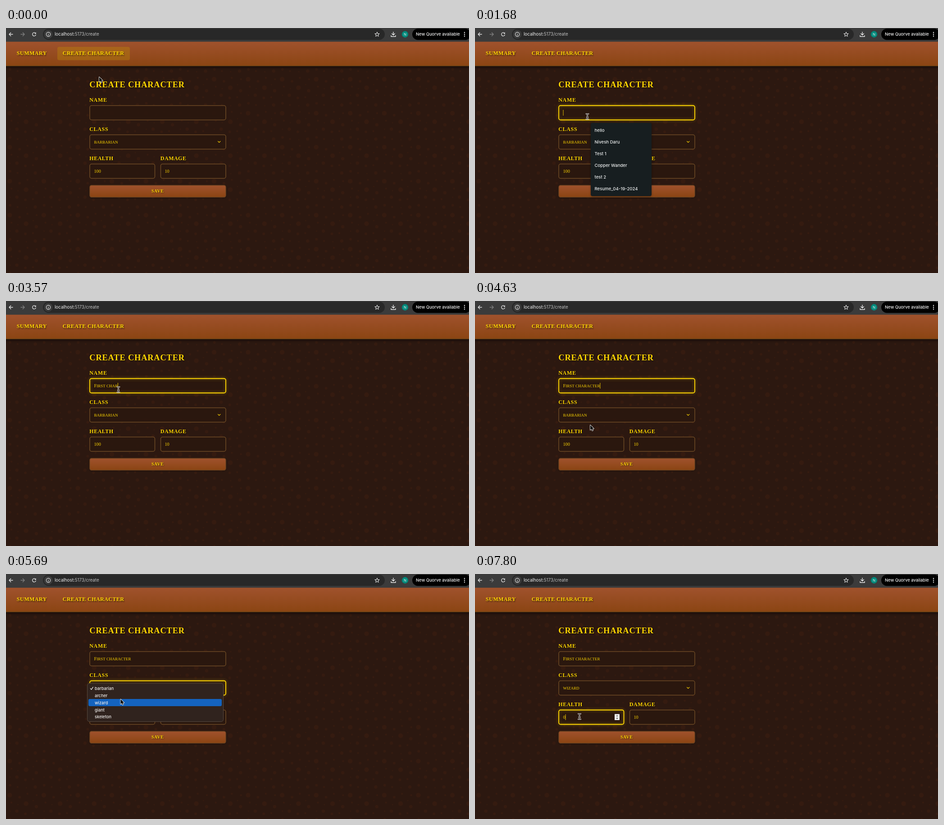
These frames come from a looping animation (1028 by 545 pixels, 8000 ms). An HTML page with a canvas:

```html
<!DOCTYPE html>
<html lang="en">
<head>
<meta charset="utf-8">
<title>Create Character</title>
<style>
html, body { margin: 0; width: 100%; height: 100%; overflow: hidden; background: #2c1810; }
canvas { display: block; width: 1028px; height: 545px; }
</style>
</head>
<body>
<canvas id="stage" width="1028" height="545"></canvas>
<script>
const W = 1028, H = 545, LOOP = 8000;
const GOLD = '#ffd700', BORDER = '#6d4a24';
const SERIF = '"Liberation Serif", "Noto Serif", serif';
const SANS = 'Inter, "Liberation Sans", sans-serif';

const stage = document.getElementById('stage').getContext('2d');
const page = document.createElement('canvas');
page.width = W;
page.height = H;
let c = page.getContext('2d');

const clamp = v => Math.max(0, Math.min(1, v));
const ramp = (t, start, length) => clamp((t - start) / length);
const ease = p => p * p * (3 - 2 * p);

function text(str, x, y, font, color, spacing = 0) {
  c.font = font;
  c.fillStyle = color;
  c.letterSpacing = spacing + 'px';
  c.fillText(str, x, y);
  return x + c.measureText(str).width;
}

function box(x, y, w, h, r, fill, stroke, line = 1.5) {
  c.beginPath();
  c.roundRect(x, y, w, h, r);
  if (fill) { c.fillStyle = fill; c.fill(); }
  if (stroke) { c.strokeStyle = stroke; c.lineWidth = line; c.stroke(); }
}

function disc(x, y, r, fill) {
  c.beginPath();
  c.arc(x, y, r, 0, 7);
  c.fillStyle = fill;
  c.fill();
}

function path(d, x, y, stroke, line, fill) {
  const p = new Path2D(d);
  c.save();
  c.translate(x, y);
  if (stroke) { c.strokeStyle = stroke; c.lineWidth = line; c.stroke(p); }
  if (fill) { c.fillStyle = fill; c.fill(p); }
  c.restore();
}

function shadow(color, blur, dx = 0, dy = 0) {
  c.shadowColor = color;
  c.shadowBlur = blur;
  c.shadowOffsetX = dx;
  c.shadowOffsetY = dy;
}

function heading(str, x, y, size, spacing) {
  c.save();
  shadow('rgba(0,0,0,.55)', 2, 1.2, 1.2);
  text(str, x, y, `bold ${size}px ${SERIF}`, GOLD, spacing);
  c.restore();
}

// Capitals with smaller capitals for lower case
function caps(str, x, y) {
  for (const run of str.match(/[A-Z0-9]+|[^A-Z0-9]+/g) || []) {
    const big = /[A-Z0-9]/.test(run);
    x = text(run.toUpperCase(), x, y, `${big ? 10.2 : 9}px ${SERIF}`, GOLD);
  }
  return x;
}

function brownGradient(y, h) {
  const g = c.createLinearGradient(0, y, 0, y + h);
  g.addColorStop(0, '#a0522d');
  g.addColorStop(1, '#8b4513');
  return g;
}

// x, y, radius in a tile of 100 units
const bubbles = [
  [11, 11, 7], [59, 36, 7], [16, 33, 3], [79, 64, 3], [34, 87, 3], [90, 11, 3],
  [12, 82, 4], [40, 17, 4], [63, 7, 3], [57, 66, 4], [86, 87, 5], [32, 58, 5],
  [89, 45, 5], [80, 27, 2], [60, 89, 2], [35, 39, 2], [12, 58, 2]
];

function drawToolbar() {
  c.fillStyle = '#3b3b3b';
  c.fillRect(0, 0, W, 30.5);
  box(82, 1.5, 759, 25, 12.5, '#282828');
  box(902, 1.5, 130, 25, 12.5, '#000');
  c.lineCap = c.lineJoin = 'round';
  path('M4 0H-4M-.3-3.8L-4 0L-.3 3.8', 11, 14, '#e4e4e4', 1.3);
  path('M-4 0H4M.3-3.8L4 0L.3 3.8', 37, 14, '#808080', 1.3);
  path('M3.6 1.2A3.8 3.8 0 1 1 2.8-2.6', 62.5, 14, '#e4e4e4', 1.3);
  path('M4.2-4.6V-1H.6Z', 62.5, 14, null, 0, '#e4e4e4');
  disc(94, 14, 9.5, '#3c3c3c');
  path('M4.6 0A4.6 4.6 0 1 1-4.6 0A4.6 4.6 0 1 1 4.6 0M0-.3V2.2M0-2.3V-2.2', 94, 14, '#e8e8e8', 1.1);
  const end = text('localhost:', 108, 17.4, `9.8px ${SANS}`, '#f0f0f0');
  text('5173/create', end, 17.4, `9.8px ${SANS}`, '#c0c0c0');

  let star = '';
  for (let i = 0; i < 10; i++) {
    const a = i * Math.PI / 5, r = i % 2 ? 2.3 : 5.3;
    star += `${i ? 'L' : 'M'}${r * Math.sin(a)} ${-r * Math.cos(a)}`;
  }
  path(star + 'Z', 824, 14.3, '#d8d8d8', 1.1);
  path('M0-5V1.6M-3.2-1.4L0 1.8L3.2-1.4M-5 2.6V5H5V2.6', 860, 14, '#ededed', 1.4);
  disc(886, 14, 7.2, '#00897b');
  c.textAlign = 'center';
  text('N', 886, 17, `8px ${SANS}`, '#e8f5f3');
  c.textAlign = 'left';
  text('New Quorve available', 910, 17.4, `500 9.4px ${SANS}`, '#f2f2f2');
  for (const dy of [-4, 0, 4]) disc(1018, 14 + dy, 1.2, '#f0f0f0');
}

function drawPage() {
  c.fillStyle = '#2c1810';
  c.fillRect(0, 0, W, H);
  const k = 0.756, tile = 100 * k;
  for (let y = 30; y < H; y += tile)
    for (let x = 0; x < W; x += tile)
      for (const [bx, by, r] of bubbles) disc(x + bx * k, y + by * k, r * k, 'rgba(139,69,19,.09)');

  c.save();
  shadow('rgba(0,0,0,.55)', 7, 0, 2.5);
  c.fillStyle = '#6b4214';
  c.fillRect(-10, 40, W + 20, 45);
  c.restore();
  c.fillStyle = brownGradient(30, 54);
  c.fillRect(0, 30, W, 53.5);
  drawToolbar();

  heading('CREATE CHARACTER', 185.3, 132.2, 18.5, 0.75);
  heading('NAME', 185.3, 163.5, 12, 0.65);
  heading('CLASS', 185.3, 228.5, 12, 0.65);
  heading('HEALTH', 185.3, 293.5, 12, 0.5);
  heading('DAMAGE', 342.8, 293.5, 12, 0.5);

  c.save();
  shadow('rgba(0,0,0,.35)', 4, 0, 1.5);
  box(186, 350, 302, 26.3, 4, '#8b4513');
  c.restore();
  box(186, 350, 302, 26.3, 4, brownGradient(350, 26), '#6f4420');
  heading('SAVE', 323, 366, 10, 0.5);
}

drawPage();
c = stage;

// Pointer path: time, x, y
const moves = [
  [150, 207, 109], [590, 249.5, 197], [4400, 249.5, 197], [4630, 256, 276],
  [4770, 255, 255], [5340, 255, 255], [5690, 254.5, 278.5], [5870, 254, 286],
  [6490, 254, 286], [6830, 232, 317]
];

function pointer(t) {
  let a = moves[0];
  for (const b of moves) {
    if (t < b[0]) {
      const p = ease(ramp(t, a[0], b[0] - a[0] || 1));
      return [a[1] + (b[1] - a[1]) * p, a[2] + (b[2] - a[2]) * p];
    }
    a = b;
  }
  return [a[1], a[2]];
}

const NAME = 'First character';
const keys = [2330, 2410, 2480, 2560, 2740, 2800, 3100, 3180, 3270, 3570, 3750, 3860, 4040, 4220, 4330];
const rows = ['barbarian', 'archer', 'wizard', 'giant', 'skeleton'];
const recent = ['hello', 'Nivesh Daru', 'Test 1', 'Copper Wander', 'test 2', 'Resume_04-19-2024'];
const FOCUS = { name: 600, select: 4790, health: 6860 };
const MENU_OPEN = 4860, MENU_FADE = 6310, PICKED = 6450;

const focus = (t, on, off) => ramp(t, on, 130) * (1 - ramp(t, off, 130));

function field(x, y, w, glow) {
  box(x, y, w, 32, 4, 'rgba(42,23,15,.85)', BORDER);
  if (!glow) return;
  c.save();
  c.globalAlpha = glow;
  shadow('rgba(255,215,0,.5)', 6);
  box(x, y, w, 32, 4, null, GOLD, 1.8);
  c.restore();
}

function caret(x, y) {
  c.fillStyle = GOLD;
  c.fillRect(x, y, 0.9, 13);
}

function drawForm(t) {
  field(186, 172.5, 302, focus(t, FOCUS.name, FOCUS.select));
  const typed = keys.filter(k => k <= t).length;
  const nameEnd = caps(NAME.slice(0, typed), 195.5, 191.5);
  const hidden = (t >= 1200 && t < 1680) || (t >= 2150 && t < 2330);
  if (t >= FOCUS.name && t < FOCUS.select && !hidden) caret(nameEnd, 182);

  field(186, 237.5, 302, focus(t, FOCUS.select, FOCUS.health));
  caps(t < PICKED ? 'barbarian' : 'wizard', 195.5, 256.5);
  path('M-2.6-1.3L0 1.3L2.6-1.3', 473.3, 253.3, GOLD, 1.1);

  field(186, 302.5, 144.5, focus(t, FOCUS.health, LOOP));
  const health = t < 7600 ? '100' : t < 7700 ? '10' : t < 7800 ? '1' : '0';
  const healthEnd = caps(health, 195.5, 321.7);
  if (t >= FOCUS.health && !(t >= 7510 && t < 7600)) caret(healthEnd, 312);

  field(343.5, 302.5, 144.5, 0);
  caps('10', 352.5, 321.7);
}

function drawRecent() {
  c.save();
  shadow('rgba(0,0,0,.4)', 4, 0, 1);
  box(257, 211, 135, 163, 4, '#171e20');
  c.restore();
  recent.forEach((s, i) => text(s, 265.5, 231.2 + 26 * i, `500 9.6px ${SANS}`, '#eef0f0'));
}

function drawMenu(t, y) {
  c.save();
  c.globalAlpha = 1 - ramp(t, MENU_FADE, 130);
  box(180.5, 243, 302, 85.5, 5, '#30231e', '#57493f', 1);
  const picked = Math.max(0, Math.min(4, Math.floor((y - 246.5) / 15.9)));
  box(183, 246.3 + 15.9 * picked, 296, 15.9, 3, '#1463bf');
  rows.forEach((s, i) => text(s, 197, 257.8 + 15.9 * i, `500 9.2px ${SANS}`, '#f2efed'));
  path('M-2.8 .3L-.8 2.7L2.9-2.8', 190.3, 254.4, '#f2efed', 1.3);
  c.restore();
}

function drawPointer(x, y, beam) {
  c.lineCap = c.lineJoin = 'round';
  if (beam) {
    const d = 'M-2.6-6Q0-6 0-4.4Q0-6 2.6-6M0-4.4V4.4M-2.6 6Q0 6 0 4.4Q0 6 2.6 6M-1.3 1.6H1.3';
    path(d, x, y, '#e8e4e2', 2.7);
    path(d, x, y, '#1a1210', 1);
  } else {
    path('M0 0V11L2.6 8.6L4.4 12.6L6.1 11.8L4.4 7.9H7.8Z', x, y, '#f4f4f4', 1.7, '#080808');
  }
}

function frame(now) {
  const t = now % LOOP;
  c.drawImage(page, 0, 0);

  const hover = 1 - ramp(t, 150, 300);
  if (hover > 0) box(114, 42, 161, 29.5, 4, `rgba(184,134,11,${0.4 * hover})`);
  heading('SUMMARY', 23.8, 60.3, 12, 0.5);
  heading('CREATE CHARACTER', 125.8, 60.3, 12, 0.45);

  drawForm(t);
  const [x, y] = pointer(t);
  const overName = x > 185 && y > 172 && y < 205;
  const overHealth = x > 185 && x < 331 && y > 302 && y < 335;
  if (overHealth) {
    box(310, 311.5, 11, 13.5, 0.5, '#efefef');
    path('M-2.2-1.8H2.2L0-4.4ZM-2.2 1.8H2.2L0 4.4Z', 315.5, 318.3, null, 0, '#4a4a4a');
  }
  if (t >= 680 && t < keys[0]) drawRecent();
  if (t >= MENU_OPEN && t < MENU_FADE + 130) drawMenu(t, y);
  drawPointer(x, y, overName || overHealth);
}

const start = performance.now();
function tick() {
  frame(performance.now() - start);
  requestAnimationFrame(tick);
}
tick();
</script>
</body>
</html>
```
